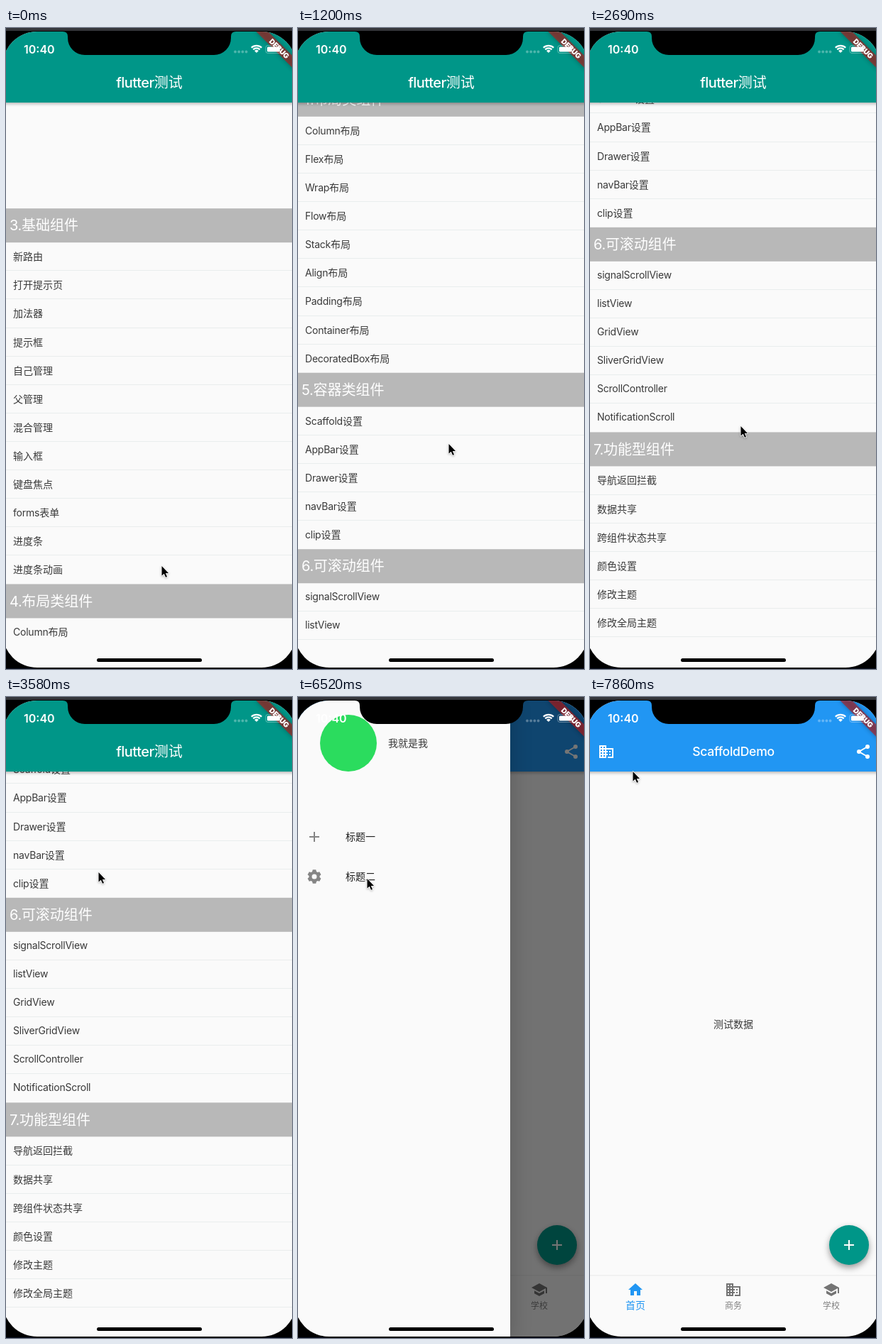
These frames come from a looping animation (403 px wide and 903 px high, 8 s). An HTML page with a canvas:

```html
<!DOCTYPE html>
<html lang="zh">
<head>
<meta charset="utf-8">
<style>
html, body { margin: 0; width: 100%; height: 100%; overflow: hidden; background: #000; }
canvas { display: block; }
</style>
</head>
<body>
<canvas id="stage" width="403" height="903"></canvas>
<script>
const ctx = document.getElementById('stage').getContext('2d');
const LOOP = 8000, STEPS = 54;
// The phone screen is wider than the stage
const LEFT = -5, TOP = 5, W = 414, H = 896, BAR = 105, SAFE = 867;
const PAPER = '#fafafa', INK = '#393939', TEAL = '#009688', BLUE = '#2196f3', GREY = '#757575';
const ROW = 40.1, HEAD = 48, LIST_TOP = 254.2;

const sections = [
  ['3.基础组件', '新路由', '打开提示页', '加法器', '提示框', '自己管理', '父管理', '混合管理',
    '输入框', '键盘焦点', 'forms表单', '进度条', '进度条动画'],
  ['4.布局类组件', 'Column布局', 'Flex布局', 'Wrap布局', 'Flow布局', 'Stack布局', 'Align布局',
    'Padding布局', 'Container布局', 'DecoratedBox布局'],
  ['5.容器类组件', 'Scaffold设置', 'AppBar设置', 'Drawer设置', 'navBar设置', 'clip设置'],
  ['6.可滚动组件', 'signalScrollView', 'listView', 'GridView', 'SliverGridView',
    'ScrollController', 'NotificationScroll'],
  ['7.功能型组件', '导航返回拦截', '数据共享', '跨组件状态共享', '颜色设置', '修改主题', '修改全局主题']
];

// Keys: [step, value, ...]; the list follows each drag, then glides on
const scrollKeys = [[0, 0], [1, 90], [3, 430], [4, 515], [5, 590], [6, 645], [8, 706.6],
  [11, 986], [12, 1032.6], [13, 1070], [14, 1102], [16, 1145], [18, 1160], [21, 1205],
  [22, 1185], [23, 1168], [24, 1158], [26, 1151.5]];
const pushKeys = [[27, 0], [28, .6], [29, .96], [30, 1]];
const drawerKeys = [[34, 0], [35, .4], [36, .95], [37, 1], [50, 1], [51, .55], [52, .06], [53, 0]];
const cursorKeys = [[0, 219, 757], [1, 217, 667], [3, 205, 330], [4, 205, 340], [7, 212, 610],
  [8, 212, 585], [11, 203, 310], [12, 203, 305], [18, 212, 560], [21, 205, 400], [22, 200, 380],
  [26, 60, 112], [28, 60, 112], [32, 33, 89], [35, 22, 80], [38, 22, 80], [40, 111, 214],
  [41, 104, 205], [42, 104, 205], [44, 97, 255], [45, 97, 255], [48, 322, 238], [51, 322, 238],
  [53, 60, 104]];

function track(keys, k) {
  const i = keys.findIndex(key => key[0] > k);
  if (i < 0) return keys[keys.length - 1].slice(1);
  if (i === 0) return keys[0].slice(1);
  const a = keys[i - 1], b = keys[i], f = (k - a[0]) / (b[0] - a[0]);
  return a.slice(1).map((v, j) => v + (b[j + 1] - v) * f);
}

function rect(x, y, w, h, color) {
  ctx.fillStyle = color;
  ctx.fillRect(x, y, w, h);
}

function circle(x, y, r, color) {
  ctx.fillStyle = color;
  ctx.beginPath();
  ctx.arc(x, y, r, 0, 7);
  ctx.fill();
}

function round(x, y, w, h, r, color) {
  ctx.fillStyle = color;
  ctx.beginPath();
  ctx.roundRect(x, y, w, h, r);
  ctx.fill();
}

function shadowed(alpha, blur, dy, draw) {
  ctx.save();
  ctx.shadowColor = `rgba(0,0,0,${alpha})`;
  ctx.shadowBlur = blur;
  ctx.shadowOffsetY = dy;
  draw();
  ctx.restore();
}

function at(x, y, draw) {
  ctx.save();
  ctx.translate(x, y);
  draw();
  ctx.restore();
}

// Latin runs are set slightly tighter than Chinese ones; y is the middle of the line
function text(str, x, y, size, color, { weight = 400, center = false, tight = -.016 * size } = {}) {
  ctx.font = `${weight} ${size}px Inter, "Noto Sans CJK SC", "Noto Sans CJK", sans-serif`;
  ctx.fillStyle = color;
  const runs = str.match(/[ -~]+|[^ -~]+/g).map(s => {
    const ls = s < '~' ? tight : 0;
    ctx.letterSpacing = ls + 'px';
    return { s, ls, w: ctx.measureText(s).width };
  });
  if (center) x -= runs.reduce((sum, r) => sum + r.w, 0) / 2;
  for (const r of runs) {
    ctx.letterSpacing = r.ls + 'px';
    ctx.fillText(r.s, x, y + size * .36);
    x += r.w;
  }
  ctx.letterSpacing = '0px';
}

// Icons, 24 px, centred
const icons = {
  plus(x, y, color) {
    rect(x - 7, y - 1, 14, 2, color);
    rect(x - 1, y - 7, 2, 14, color);
  },
  business(x, y, color) {
    ctx.beginPath();
    ctx.rect(x - 10, y - 9, 10, 18);
    ctx.rect(x, y - 5, 10, 14);
    for (let i = 0; i < 4; i++) {
      ctx.rect(x - 8, y - 7 + i * 4, 2, 2);
      ctx.rect(x - 4, y - 7 + i * 4, 2, 2);
    }
    ctx.rect(x, y - 3, 8, 10);
    for (let i = 0; i < 3; i++) ctx.rect(x, y - 1 + i * 4, 2, 2);
    ctx.rect(x + 4, y - 1, 2, 2);
    ctx.rect(x + 4, y + 3, 2, 2);
    ctx.fillStyle = color;
    ctx.fill('evenodd');
  },
  share(x, y, color) {
    ctx.strokeStyle = color;
    ctx.lineWidth = 2;
    ctx.beginPath();
    ctx.moveTo(x + 6, y - 7);
    ctx.lineTo(x - 6, y);
    ctx.lineTo(x + 6, y + 7);
    ctx.stroke();
    for (const [dx, dy] of [[6, -7], [-6, 0], [6, 7]]) circle(x + dx, y + dy, 3, color);
  },
  gear(x, y, color) {
    ctx.beginPath();
    for (let i = 0; i < 6; i++) {
      for (const [off, r] of [[-.4, 7.6], [-.23, 9.9], [.23, 9.9], [.4, 7.6]]) {
        const a = i * Math.PI / 3 - Math.PI / 2 + off;
        ctx.lineTo(x + r * Math.cos(a), y + r * Math.sin(a));
      }
    }
    ctx.closePath();
    ctx.moveTo(x + 3.5, y);
    ctx.arc(x, y, 3.5, 0, 7);
    ctx.fillStyle = color;
    ctx.fill('evenodd');
  },
  path(d, x, y, color) {
    at(x - 12, y - 12, () => {
      ctx.fillStyle = color;
      ctx.fill(new Path2D(d));
    });
  }
};
const HOME = 'M10 20v-6h4v6h5v-8h3L12 3 2 12h3v8z';
const SCHOOL = 'M5 13.18v4L12 21l7-3.82v-4L12 17zM12 3L1 9l11 6 9-4.91V17h2V9z';
const ARROW = 'M.5 1V14.5L3.7 11.8 6 16.8 8 16 5.8 11H10Z';
const NOTCH = 'M80 5Q87 5 87 12V14A24 24 0 0 0 111 38H293A24 24 0 0 0 317 14V12Q317 5 324 5Z';

function appBar(color) {
  shadowed(.28, 4, 1.5, () => rect(LEFT, TOP, W, BAR - TOP, color));
}

function listPage(scroll) {
  rect(LEFT, TOP, W, H, PAPER);
  ctx.save();
  ctx.beginPath();
  ctx.rect(LEFT, BAR, W, SAFE - BAR);
  ctx.clip();
  let y = LIST_TOP - scroll;
  for (const [title, ...items] of sections) {
    rect(LEFT, y, W, HEAD, '#b8b8b8');
    text(title, 5, y + 24, 20, '#fff');
    y += HEAD;
    items.forEach((item, i) => {
      // Lines without Chinese glyphs sit a little higher
      text(item, 10, y + (/^\w+$/.test(item) ? 18.7 : 20), 14, INK);
      y += ROW;
      if (i < items.length - 1 || title[0] === '7') rect(LEFT, Math.round(y) - 1, W, 1, '#e9eded');
    });
  }
  ctx.restore();
  appBar(TEAL);
  text('flutter测试', 202, 77, 20, '#fff', { weight: 500, center: true, tight: -.6 });
}

function demoPage() {
  rect(LEFT, TOP, W, H, PAPER);
  appBar(BLUE);
  icons.business(23, 77, '#fff');
  icons.share(385, 77, '#fff');
  text('ScaffoldDemo', 202, 77, 17.6, '#fff', { weight: 500, center: true });
  text('测试数据', 202, 460.5, 14, INK, { center: true });

  shadowed(.4, 10, 4, () => circle(365, 772, 28, TEAL));
  icons.plus(365, 772, '#fff');

  rect(LEFT, 814, W, 1, '#eee');
  rect(LEFT, 815, W, 1, '#f4f4f4');
  icons.path(HOME, 64, 835, BLUE);
  icons.business(202, 835, GREY);
  icons.path(SCHOOL, 340, 835, GREY);
  text('首页', 64, 857, 14, BLUE, { center: true });
  text('商务', 202, 858, 12, '#808080', { center: true });
  text('学校', 340, 858, 12, '#808080', { center: true });
}

function drawer(open) {
  rect(LEFT, TOP, W, H, `rgba(0,0,0,${.54 * open})`);
  at(-304 * (1 - open), 0, () => {
    shadowed(.2, 30, 6, () => rect(LEFT, TOP, 304, H, PAPER));
    circle(71, 65, 40, '#2bdc5e');
    text('我就是我', 127, 65, 14, INK);
    icons.plus(23, 197, '#858585');
    icons.gear(23, 253, '#858585');
    text('标题一', 67, 197, 14, '#222', { weight: 500 });
    text('标题二', 67, 253, 14, '#222', { weight: 500 });
  });
}

function debugBanner() {
  at(LEFT + W, TOP, () => {
    ctx.rotate(Math.PI / 4);
    shadowed(.5, 6, 0, () => rect(-40, 28, 80, 12, 'rgba(183,28,28,.63)'));
    text('DEBUG', 0, 34, 10.2, '#fff', { weight: 900, center: true });
  });
}

function statusBar() {
  text('10:40', 25, 30, 16, '#fff', { weight: 600, tight: 0 });
  for (let i = 0; i < 4; i++) circle(323 + i * 5.2, 33.5, 1.9, 'rgba(255,255,255,.3)');
  ctx.strokeStyle = '#fff';
  ctx.lineWidth = 2.3;
  for (const r of [6.6, 10.2]) {
    ctx.beginPath();
    ctx.arc(353, 35, r, -Math.PI * .75, -Math.PI * .25);
    ctx.stroke();
  }
  ctx.fillStyle = '#fff';
  ctx.beginPath();
  ctx.moveTo(353, 35);
  ctx.arc(353, 35, 4, -Math.PI * .75, -Math.PI * .25);
  ctx.fill();
  ctx.strokeStyle = 'rgba(255,255,255,.35)';
  ctx.lineWidth = 1;
  ctx.beginPath();
  ctx.roundRect(366, 24.5, 22, 11, 3);
  ctx.stroke();
  round(368, 26.5, 18, 7, 1.5, '#fff');
}

function cursor(x, y) {
  at(x, y, () => {
    const arrow = new Path2D(ARROW);
    ctx.strokeStyle = '#fff';
    ctx.lineWidth = 1.6;
    ctx.lineJoin = 'round';
    shadowed(.3, 3, 1, () => ctx.stroke(arrow));
    ctx.fillStyle = '#000';
    ctx.fill(arrow);
  });
}

function draw(k) {
  const [scroll] = track(scrollKeys, k), [push] = track(pushKeys, k), [open] = track(drawerKeys, k);
  rect(0, 0, 403, 903, '#000');
  rect(0, 0, 403, 4, '#35363b');
  rect(0, 902, 403, 1, '#0b1224');

  ctx.save();
  ctx.beginPath();
  ctx.roundRect(LEFT, TOP, W, H, 49);
  ctx.clip();
  if (push < 1) at(-W / 3 * push, 0, () => listPage(scroll));
  if (push > 0) at(W * (1 - push), 0, demoPage);
  if (open > 0) drawer(open);
  debugBanner();
  statusBar();
  ctx.fillStyle = '#000';
  ctx.fill(new Path2D(NOTCH));
  round(128, 888, 148, 5, 2.5, '#000');
  ctx.restore();

  cursor(...track(cursorKeys, k));
}

function tick() {
  draw(Math.floor(performance.now() % LOOP / LOOP * STEPS));
  requestAnimationFrame(tick);
}
tick();
</script>
</body>
</html>
```
